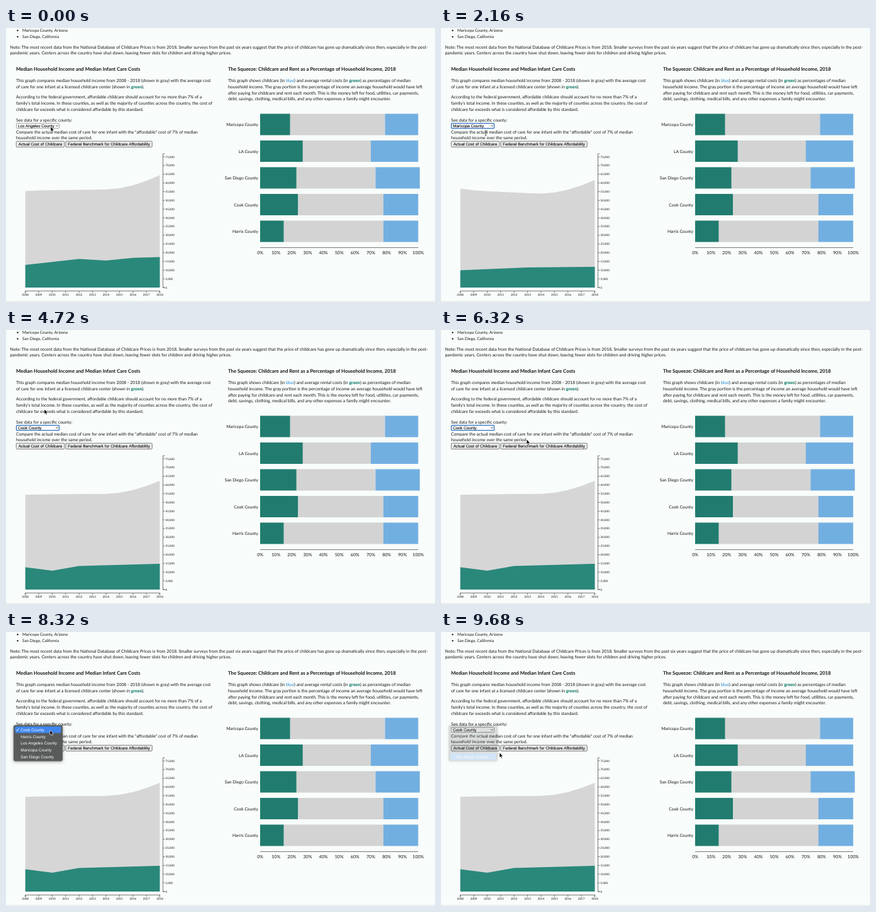
An HTML page for the animation above (9760 ms loop, 682x436 px).

```html
<!DOCTYPE html>
<html lang="en">
<head>
<meta charset="utf-8">
<title>Childcare costs</title>
<style>
  html, body { margin: 0; width: 100%; height: 100%; overflow: hidden; background: #f8fcfa; }
  svg { display: block; width: 682px; height: 436px; }
  text { font-family: Lato, sans-serif; fill: #151515; text-rendering: geometricPrecision; white-space: pre; }
  .ui { font-family: "Liberation Sans", Arial, sans-serif; font-size: 6.5px; fill: #000; stroke: #000; stroke-width: 0.1px; }
  .menu { fill: #fff; stroke: none; }
  .title { font-weight: bold; }
  .green { fill: #1f8375; font-weight: 900; }
  .blue { fill: #55a3dc; font-weight: bold; }
</style>
</head>
<body>
<svg id="stage" viewBox="0 0 682 436" xmlns="http://www.w3.org/2000/svg"></svg>
<script>
const LOOP = 9760, STEP = 80, FADE = 200;
const ROW = 10.7, SELECT_Y = 155.5;
const YEARS = 10, X0 = 30.7, X1 = 244.5, BASE = 413, PER_THOUSAND = 2.773;
const NAMES = ["Cook", "Harris", "Los Angeles", "Maricopa", "San Diego"];
const [COOK, , LOS_ANGELES, MARICOPA] = NAMES.keys();
const stage = document.getElementById("stage");

function set(el, attrs) {
  for (const key in attrs) el.setAttribute(key, attrs[key]);
}
function add(tag, attrs = {}, parent = stage, html = "") {
  const el = document.createElementNS("http://www.w3.org/2000/svg", tag);
  set(el, attrs);
  el.innerHTML = html;
  return parent.appendChild(el);
}
const rect = (x, y, width, height, fill, more = {}, parent = stage) =>
  add("rect", { x, y, width, height, fill, ...more }, parent);
const label = (x, y, size, html, more = {}, parent = stage) =>
  add("text", { x, y, "font-size": size, ...more }, parent, html);
const line = (d) => add("path", { d, fill: "none", stroke: "#222", "stroke-width": 0.6 });
const lines = (x, y, rows, size = 6.84) =>
  rows.forEach((row, i) => label(x, y + i * 9.75, size, row));
const show = (el, visible) => set(el, { display: visible ? "inline" : "none" });

// Page text
["Maricopa County, Arizona", "San Diego, California"].forEach((place, i) => {
  add("circle", { cx: 18.5, cy: 4 + i * 10, r: 1.2, fill: "#151515" });
  label(26, 6 + i * 10, 6.36, place);
});
lines(6.5, 32.6, [
  "Note: The most recent data from the National Database of Childcare Prices is from 2018. Smaller surveys from the past six years suggest that the price of childcare has gone up dramatically since then, especially in the post-",
  "pandemic years. Centers across the country have shut down, leaving fewer slots for children and driving higher prices."
], 6.86);
label(16, 67.7, 7.8, "Median Household Income and Median Infant Care Costs", { class: "title" });
label(353, 67.7, 7.8, "The Squeeze: Childcare and Rent as a Percentage of Household Income, 2018", { class: "title" });
lines(16, 86, [
  "This graph compares median household income from 2008 - 2018 (shown in gray) with the average cost",
  'of care for one infant at a licensed childcare center (shown in <tspan class="green">green</tspan>).'
]);
lines(16, 112.2, [
  "According to the federal government, affordable childcare should account for no more than 7% of a",
  "family's total income. In these counties, as well as the majority of counties across the country, the cost of",
  "childcare far exceeds what is considered affordable by this standard."
]);
label(16, 148.5, 6.84, "See data for a specific county:");
lines(16, 167.7, [
  'Compare the actual median cost of care for one infant with the "affordable" cost of 7% of median',
  "household income over the same period."
]);
lines(353, 86.2, [
  'This graph shows childcare (in <tspan class="blue">blue</tspan>) and average rental costs (in <tspan class="green">green</tspan>) as percentages of median',
  "household income. The gray portion is the percentage of income an average household would have left",
  "after paying for childcare and rent each month. This is the money left for food, utilities, car payments,",
  "debt, savings, clothing, medical bills, and any other expenses a family might encounter."
], 6.9);

// Select box and buttons
const selectBox = rect(16.5, 151.6, 68, 8, "#fff", { rx: 1.2 });
const selectText = label(19, 157.9, 6.5, "", { class: "ui" });
add("path", { d: "M79.3 154.8l1.6 1.6 1.6-1.6", fill: "none", stroke: "#111", "stroke-width": 0.9 });
function button(x, width, text) {
  rect(x, 180.2, width, 9.2, "#efefef", { rx: 1, stroke: "#5c5c5c", "stroke-width": 0.8 });
  label(x + width / 2, 187.1, 6.5, text, { class: "ui", "text-anchor": "middle" });
}
button(16.3, 76.5, "Actual Cost of Childcare");
button(95, 137.3, "Federal Benchmark for Childcare Affordability");

// Income chart
const yearX = (i) => X0 + (X1 - X0) * i / YEARS;
const moneyY = (thousands) => BASE - thousands * PER_THOUSAND;
const incomeArea = add("path", { fill: "#d6d6d6" });
const costArea = add("path", { fill: "#2a887b" });
line(`M252.5 200H249.5V${BASE}H252.5`);
for (let k = 0; k <= 75; k += 5) {
  line(`M249.5 ${moneyY(k)}h3`);
  label(253.5, moneyY(k) + 1.5, 4.6, k ? k + ",000" : "0");
}
line(`M${X0} 421.5V418.5H${X1}V421.5`);
for (let i = 0; i <= YEARS; i++) {
  line(`M${yearX(i)} 418.5v3`);
  label(yearX(i), 425.5, 4.6, 2008 + i, { "text-anchor": "middle" });
}

// Stacked bars: shares of childcare, what is left, and rent
const percentX = (p) => 404 + p * 2.513;
function bar(name, y, shares) {
  let from = 0;
  shares.forEach((share, i) => {
    rect(percentX(from), y, share * 2.513, 34, ["#217c6f", "#d3d3d3", "#72afe1"][i]);
    from += share;
  });
  label(401, y + 19.5, 6.72, name + " County", { "text-anchor": "end" });
}
Object.entries({
  Maricopa: [19, 60, 21], LA: [27, 43, 30], "San Diego": [23, 50, 28],
  Cook: [24, 54, 22], Harris: [15, 63, 22]
}).forEach(([name, shares], i) => bar(name, 136.5 + i * 42.5, shares));
line(`M${percentX(0)} 349.5H${percentX(100)}`);
for (let p = 0; p <= 100; p += 10)
  label(percentX(p), 359.8, 7.05, p + "%", { "text-anchor": "middle" });
rect(0, 434.3, 682, 1.7, "#eceeed");

// Menu
const menu = add("g", { style: "filter:drop-shadow(0 1.5px 2.5px rgba(0,0,0,.35))" });
rect(12, -7.3, 78, 57.4, "#575959", { rx: 3, "fill-opacity": 0.97, stroke: "#777", "stroke-width": 0.4 }, menu);
const highlight = rect(14.5, 0, 73, ROW, "#3f86ee", { rx: 2 }, menu);
const check = add("path", { fill: "none", stroke: "#fff", "stroke-width": 0.9 }, menu);
NAMES.forEach((name, i) =>
  label(23.3, i * ROW + 2.4, 6.5, name + " County", { class: "ui menu" }, menu));

// Pointers
const arrow = add("path", {
  d: "M0 0V7.8L1.8 6.2 3 9 4.3 8.4 3.1 5.7H5.6Z",
  fill: "#000", stroke: "#fff", "stroke-width": 0.6
});
const beam = add("path", {
  d: "M-1.3-3.5H1.3M0-3.5V4M-1.3 4H1.3",
  fill: "none", stroke: "#222", "stroke-width": 0.7
});

// Income drifts until 2014, then climbs; cost joins a few [year, thousands] points.
const COUNTIES = {
  [LOS_ANGELES]: { start: 55.4, drift: 0.9, rise: 8.2, cost: [[0, 13], [4, 16.4], [6, 15.5], [8, 17], [10, 17.5]] },
  [MARICOPA]: { start: 56.8, drift: -2.9, rise: 7.9, cost: [[0, 9.9], [5, 11.5], [10, 11.9]] },
  [COOK]: { start: 54.4, drift: 0.5, rise: 7.5, cost: [[0, 12.8], [2, 10.8], [4, 13.5], [10, 14.8]] }
};
const incomePoints = ({ start, drift, rise }) => Array.from({ length: YEARS + 1 }, (_, i) =>
  [i, start + drift * Math.min(1, i / 6) ** 0.6 + rise * Math.max(0, (i - 6) / 4) ** 1.8]);
const area = (points) =>
  `M${X0} ${BASE}` + points.map(([i, k]) => `L${yearX(i)} ${moneyY(k)}`).join("") + `V${BASE}Z`;

const MOVES = [
  { from: 480, to: 1120, x: 71, y: 167 },
  { from: 2160, to: 2880, x: 66, y: 156 },
  { from: 3200, to: 3920, x: 61, y: 126 },
  { from: 5600, to: 6560, x: 150, y: 183 },
  { from: 7120, to: 7440, x: 78, y: 182 },
  { from: 7840, to: 8160, x: 70, y: 156 },
  { from: 8320, to: 8880, x: 68, y: 184 },
  { from: 8960, to: 9280, x: 72, y: 196 },
  { from: 9360, to: 9680, x: 93, y: 192 }
];
const MENUS = [
  { open: 160, close: 1200, selected: LOS_ANGELES },
  { open: 3200, close: 4240, selected: MARICOPA },
  { open: 8320, close: 9520, selected: COOK }
];
const clamp = (v, low, high) => Math.max(low, Math.min(high, v));

function pointerAt(t) {
  let x = 71, y = 157;
  for (const move of MOVES) {
    const u = clamp((t - move.from) / (move.to - move.from), 0, 1);
    const eased = u * u * (3 - 2 * u);
    x += (move.x - x) * eased;
    y += (move.y - y) * eased;
  }
  return [x, y];
}

function drawMenu(t) {
  const current = MENUS.find(({ open, close }) => t >= open && t < close + FADE);
  show(menu, current);
  if (!current) return;
  const { close, selected } = current;
  const [, y] = pointerAt(Math.min(t, close));
  const row = clamp(Math.round((y - SELECT_Y) / ROW) + selected, 0, NAMES.length - 1);
  set(menu, {
    transform: `translate(0 ${SELECT_Y - selected * ROW})`,
    opacity: clamp(1 - (t - close) / FADE, 0, 1)
  });
  set(highlight, { y: (row - 0.5) * ROW });
  set(check, { d: `M16.3 ${selected * ROW + 0.3}l1.5 1.9 2.5-4.4` });
}

function draw(t) {
  const selected = t < 1440 ? LOS_ANGELES : t < 4480 ? MARICOPA : COOK;
  const federal = t >= 6720 && t < 7600;
  const focused = t >= 1440 && t < 6640;
  const county = COUNTIES[selected];
  const income = incomePoints(county);
  set(incomeArea, { d: area(income) });
  set(costArea, { d: area(federal ? income.map(([i, k]) => [i, k * 0.07]) : county.cost) });
  selectText.textContent = NAMES[selected] + " County";
  set(selectBox, { stroke: focused ? "#2f6fc0" : "#767676", "stroke-width": focused ? 1.3 : 0.7 });
  drawMenu(t);

  const transform = `translate(${pointerAt(t).join(" ")})`;
  const overText = t >= 1840 && t < 2560;
  set(arrow, { transform });
  set(beam, { transform });
  show(arrow, !overText);
  show(beam, overText);
}

const start = performance.now();
function tick(now) {
  const t = Math.max(0, now - start) % LOOP;
  draw(Math.floor(t / STEP) * STEP);
  requestAnimationFrame(tick);
}
draw(0);
requestAnimationFrame(tick);
</script>
</body>
</html>
```
